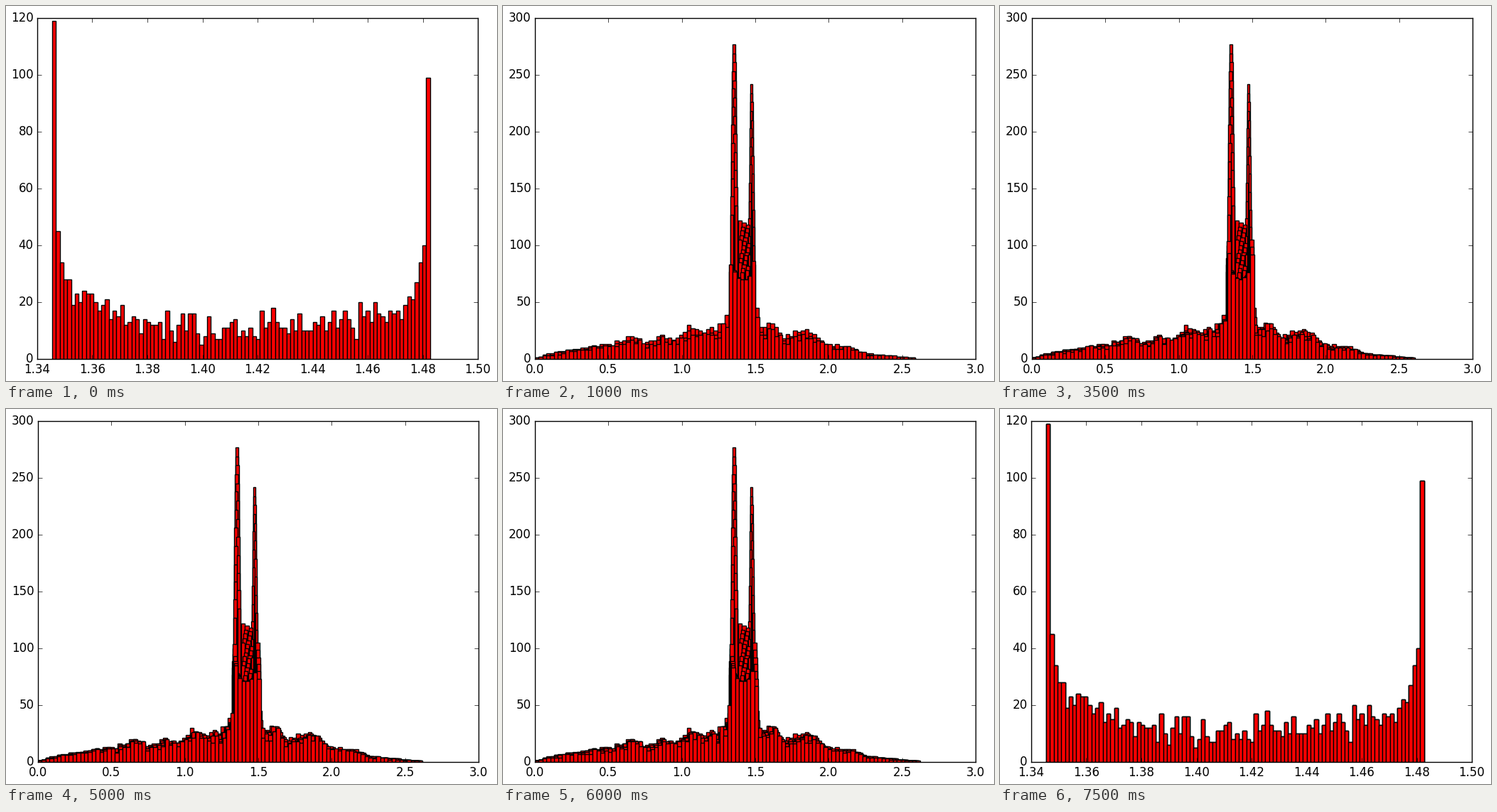
Recreate the animation shown at these times as a matplotlib script. Size 691x528 px, loop 8 s.

```python
import numpy as np
import matplotlib.pyplot as plt
from matplotlib.animation import FuncAnimation

plt.style.use("classic")
plt.rcParams.update({"font.family": "DejaVu Sans", "savefig.dpi": "figure",
                     "figure.facecolor": "white"})

W, H, DPI = 691, 528, 100
BINS = 100
# Histogram steps in alphabetical order of their numbers: 1, 10, 11, ... 2, 20, ...
STEPS = sorted(range(1, 23), key=str)[:16]

# Rough outline of the wide histograms: value, count
OUTLINE = [(0, 1), (.1, 5), (.27, 9), (.4, 11), (.58, 15), (.68, 21), (.76, 14),
           (.86, 20), (1, 18), (1.05, 29), (1.15, 23), (1.29, 30), (1.34, 45),
           (1.52, 30), (1.63, 31), (1.69, 19), (1.86, 25), (2.05, 12),
           (2.15, 12), (2.24, 6), (2.5, 2), (2.62, 1)]
CENTRES = (np.arange(BINS) + .5) * 2.62 / BINS
PROFILE = np.interp(CENTRES, *zip(*OUTLINE))
PROFILE *= np.random.default_rng(3).uniform(.87, 1.1, BINS)


def arcsine(t):
    """Share of a sine wave's samples that lie below t, for t in 0..1."""
    return 2 / np.pi * np.arcsin(np.sqrt(t))


def narrow_hist():
    edges = np.linspace(1.3454, 1.4826, BINS + 1)
    counts = 1500 * np.diff(arcsine(np.linspace(0, 1, BINS + 1)))
    counts *= np.linspace(1.245, 1.035, BINS)
    counts[1:-1] += np.random.default_rng(8).normal(0, 2.8, BINS - 2)
    return edges, np.round(np.maximum(counts, 5))


def wide_hist(step):
    edges = np.linspace(0, 2.5515 + .0035 * step, BINS + 1)
    wings = np.interp((edges[:-1] + edges[1:]) / 2, CENTRES, PROFILE)
    wings *= np.random.default_rng(step).uniform(.65, 1, BINS)
    t = np.clip((edges - 1.328) / .18, 0, 1)
    core = 568 * np.diff(.6 * t + .4 * arcsine(t))
    return edges, np.round(np.maximum(np.maximum(wings, 1), core))


def peak_bars():
    """Two peaks of ever lower bars that drift outwards, and a block between."""
    out = []
    for centre, width, top, drift in [(1.355, .021, 277, .014), (1.474, .015, 242, .016)]:
        for j, t in enumerate(np.linspace(0, 1, 20)):
            x = centre + (-1) ** j * drift * t
            out.append((x - width / 2, width, round(top - 150 * t)))
    for j, h in enumerate(np.linspace(122, 76, 26)):
        out.append((1.382 + .063 * (j * .45 % 1), .025, round(h)))
    return sorted(out, key=lambda b: -b[2])


def make_axes(left, xlim, xstep, fmt, ymax, ystep):
    ax = fig.add_axes([left / W, 31 / H, 620 / W, 480 / H])
    xt = np.arange(xlim[0], xlim[1] + xstep / 2, xstep)
    yt = np.arange(0, ymax + 1, ystep)
    ax.set_xticks(xt, [format(x, fmt) for x in xt])
    ax.set_yticks(yt, [str(y) for y in yt])
    ax.set(xlim=xlim, ylim=(0, ymax))
    ax.set_autoscale_on(False)
    return ax


def bars(ax, x, w, h):
    return ax.bar(x, h, w, align="edge", color="red", edgecolor="black", linewidth=1)


def hist_bars(ax, edges, counts):
    return bars(ax, edges[:-1], np.diff(edges), counts)


fig = plt.figure(figsize=(W / DPI, H / DPI), dpi=DPI, facecolor="white")
near = make_axes(44, (1.34, 1.50), .02, ".2f", 120, 20)
far = make_axes(45, (0, 3), .5, ".1f", 300, 50)

# Layers pile up: every step is drawn over the ones before it
hist_bars(far, np.linspace(0, 2.5865, BINS + 1), np.round(PROFILE))
bars(far, *zip(*peak_bars()))
layers = {step: hist_bars(near, *narrow_hist()) for step in (1, 2, 3)}
layers |= {step: hist_bars(far, *wide_hist(step)) for step in range(10, 23)}


def update(i):
    now = STEPS[i]
    near.set_visible(now < 10)
    far.set_visible(now >= 10)
    for step, layer in layers.items():
        for bar in layer:
            bar.set_visible(step <= now)
    return []


anim = FuncAnimation(fig, update, frames=len(STEPS), interval=500,
                     init_func=lambda: update(0), repeat=True, repeat_delay=0)
plt.show()
```
